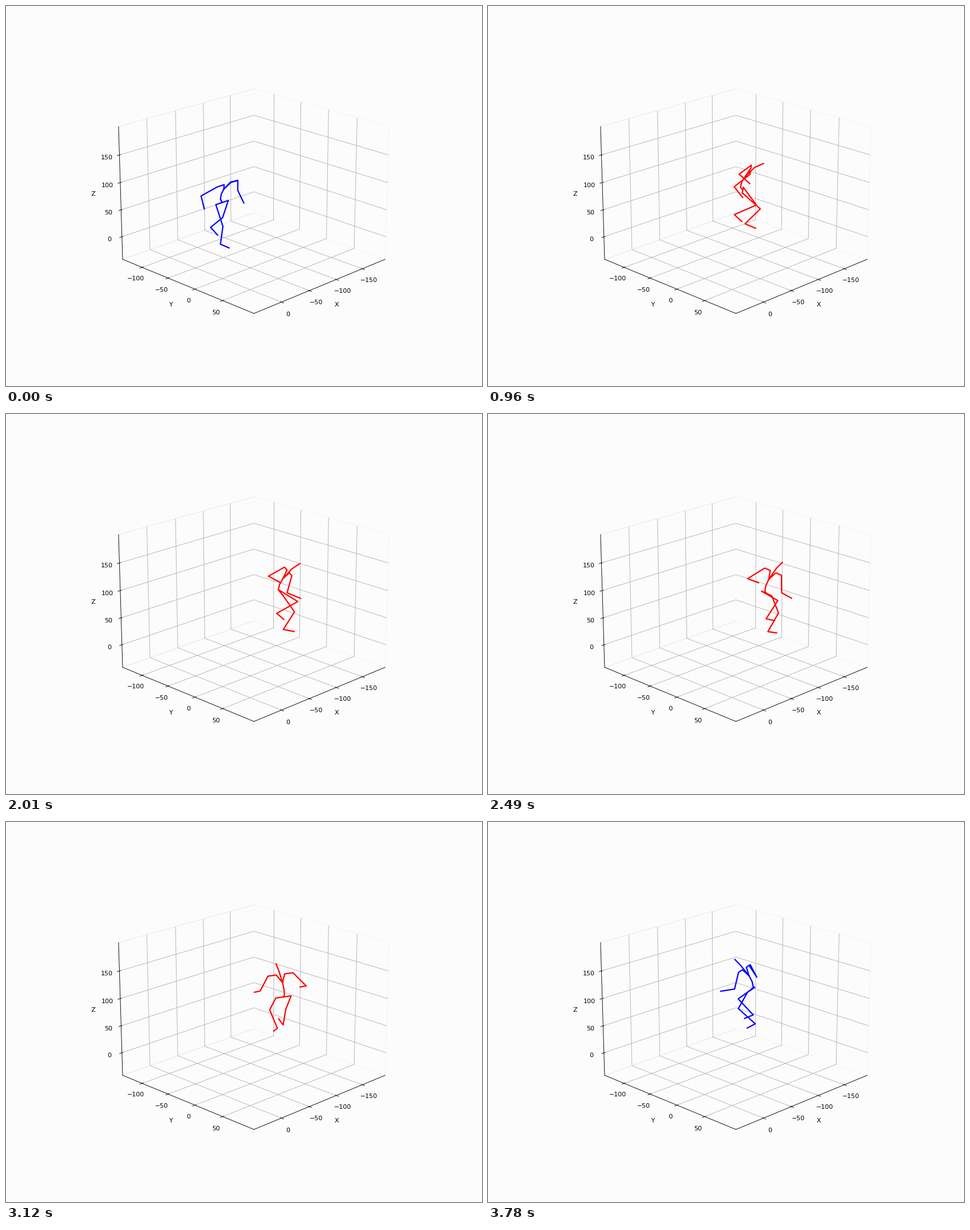
These frames come from a looping animation (837x669 px, 3810 ms). A matplotlib script:

```python
import numpy as np
import matplotlib.pyplot as plt
from matplotlib.animation import FuncAnimation

W, H, DPI = 837, 669, 80
FRAMES, INTERVAL = 127, 30
FIRST_RED, LAST_RED = 25, 124
PAPER = "#fcfcfc"
CENTER, HALF = (-73.8, -17.2, 79.2), 121.5

frame = np.arange(FRAMES)
KEYS = np.array([0, 13, 22, 32, 51, 83, 104, 126])


def ease(*values):
    """Monotone cubic through values at the key times, one per frame."""
    p = np.array(values, float)
    h = np.diff(KEYS)
    d = np.diff(p) / h
    a, b = d[:-1], d[1:]
    same = a * b > 0
    inner = np.where(same, 2 * a * b / np.where(same, a + b, 1), 0)
    m = np.concatenate([d[:1], inner, d[-1:]])
    k = np.clip(np.searchsorted(KEYS, frame, side="right") - 1, 0, len(h) - 1)
    hk = h[k]
    u = (frame - KEYS[k]) / hk
    return ((1 + 2 * u) * (1 - u) ** 2 * p[k] + u * (1 - u) ** 2 * hk * m[k]
            + u * u * (3 - 2 * u) * p[k + 1] + u * u * (u - 1) * hk * m[k + 1])


def stride(size, lead):
    """Extra swing of a running leg: whole strides, zero at both ends."""
    turn = 2 * np.pi * np.interp(frame, [32, 51, 83], [0, 1, 3])
    lead = np.radians(lead)
    return size * (np.sin(turn + lead) - np.sin(lead))


def vec(forward, right, up):
    return np.stack(np.broadcast_arrays(forward, right, up, frame * 0.0)[:3],
                    axis=-1)


def bone(length, pitch, out=0):
    """Bone swung forward by pitch from hanging, tilted sideways by out."""
    p, o = np.radians(pitch), np.radians(out)
    return length * vec(np.sin(p) * np.cos(o), np.sin(o), -np.cos(p) * np.cos(o))


def chain(start, *bones):
    return np.cumsum([start, *bones], axis=0)


def leg(side, thigh, shin, lead):
    thigh = thigh + stride(25, lead)
    shin = shin + stride(35, lead - 90)
    return chain(vec(0, 0, 0), vec(0, 11 * side, 0), bone(37, thigh),
                 bone(34.5, shin), bone(16, shin + 95))


def arm(side, upper, fore):
    return chain(chest, vec(7, 6 * side, 12.5), vec(0, 12 * side, 0),
                 bone(29, upper, 20 * side), bone(22, fore))


# Path of the hips: across the view and toward the viewer; heading turns left.
across = ease(-40.4, -20.2, -5.8, 8.9, 24.6, 40.2, 39, 20.5)
near = ease(31.9, 31.9, 13, -14.9, -41.3, -32.4, -50.2, -79.8)
heading = np.radians(ease(45, 48, 28, 3, -2, -36, -113, -154))

nod = np.linspace(63, 42, FRAMES)
body = chain(vec(0, 0, 0), bone(6, 210), bone(10, 170), bone(11, 156),
             bone(21, 144), bone(13, 180 - nod))
chest = body[3]

figure = [
    body,
    leg(1, ease(20, -15, 10, 39, 36, 18, 27, 42),
        ease(-8, -28, -75, -35, -22, -30, 14, -41), 90),
    leg(-1, ease(-17, 68, 5, 28, 45, 47, 33, 22),
        ease(-41, -32, -15, -57, -80, -34, -48, -47), 45),
    arm(1, ease(-45, -15, -31, -47, -28, -15, -50, -11),
        ease(15, 104, 67, 30, 64, 48, 62, 150)),
    arm(-1, ease(-22, -39, -38, -37, -40, -49, 6, 2),
        np.linspace(30, 68, FRAMES)),
]


def to_world(joints):
    """Body frame (forward, right, up) to x, y, z of the plot."""
    forward, right, up = np.moveaxis(joints, -1, 0)
    s = across + forward * np.cos(heading) - right * np.sin(heading)
    d = near + forward * np.sin(heading) + right * np.cos(heading)
    return (CENTER[0] + (d - s) / np.sqrt(2),
            CENTER[1] + (d + s) / np.sqrt(2), CENTER[2] + up)


fig = plt.figure(figsize=(W / DPI, H / DPI), dpi=DPI, facecolor=PAPER)
ax = fig.add_subplot(projection="3d", facecolor=PAPER)
ax.view_init(elev=20, azim=45)

limbs = [ax.plot([], [], [], lw=2)[0] for _ in figure]
paths = [to_world(joints) for joints in figure]

ticks = range(-150, 1, 50), range(-100, 51, 50), range(0, 151, 50)
for name, mid, marks in zip("xyz", CENTER, ticks):
    ax.set(**{f"{name}lim": (mid - HALF, mid + HALF),
              f"{name}ticks": marks, f"{name}label": name.upper()})
for axis in (ax.xaxis, ax.yaxis, ax.zaxis):
    axis.pane.set(fill=False, alpha=0.8)


def draw(i):
    color = "red" if FIRST_RED <= i <= LAST_RED else "blue"
    for line, xyz in zip(limbs, paths):
        line.set_data_3d(*(c[:, i] for c in xyz))
        line.set_color(color)
    return limbs


anim = FuncAnimation(fig, draw, frames=FRAMES, interval=INTERVAL,
                     repeat=True, repeat_delay=0)
plt.show()
```
